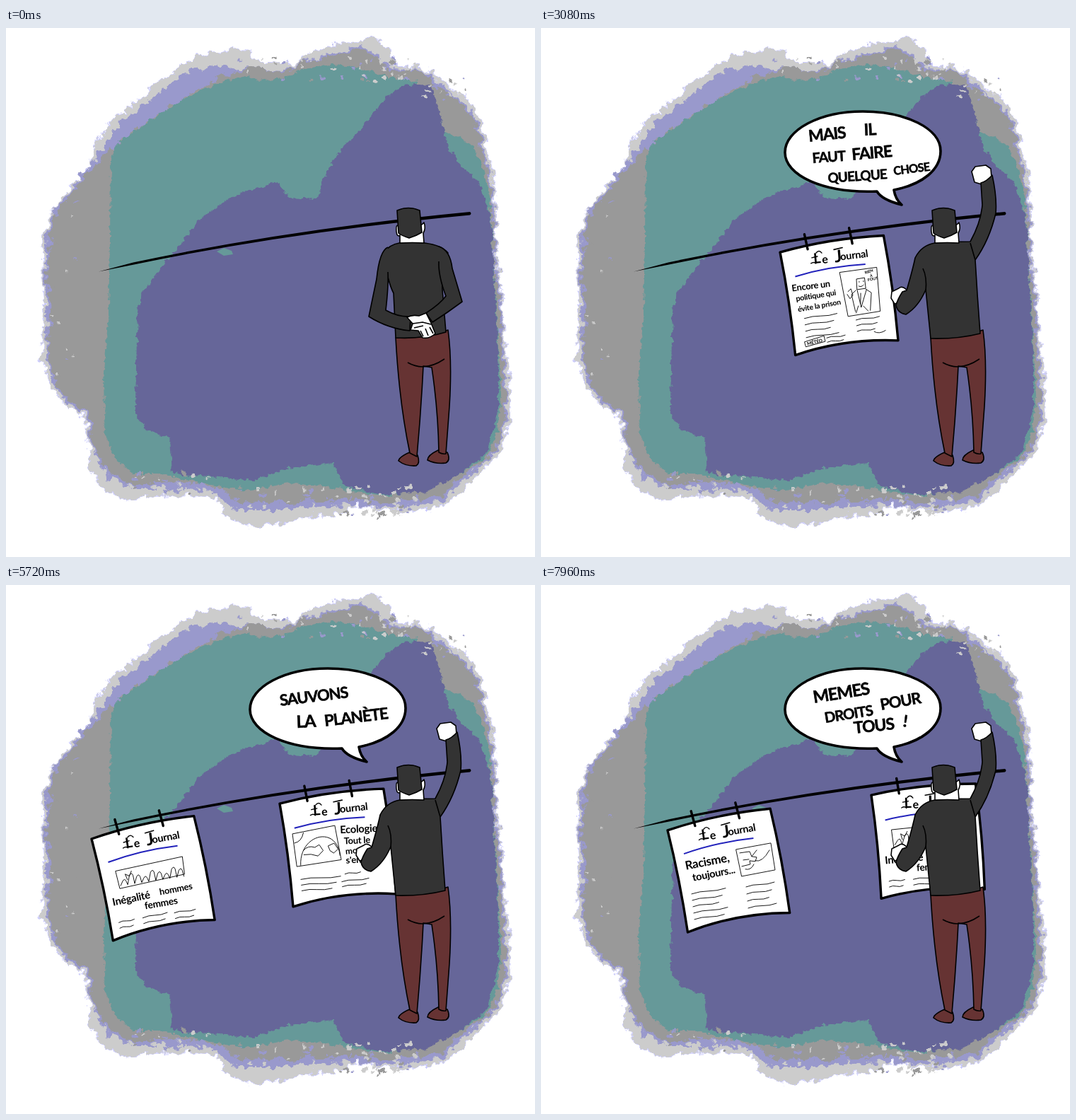
An HTML page for the animation above (8 s loop, 748 by 748 pixels).

```html
<!DOCTYPE html>
<html lang="fr">
<head>
<meta charset="utf-8">
<title>Le Journal</title>
<style>
html, body { margin: 0; width: 100%; height: 100%; overflow: hidden; background: #fff; }
svg { position: absolute; left: 0; top: 0; width: 100%; height: 100%; }
#wall { will-change: transform; }
text { font-family: Lato, "Open Sans", sans-serif; font-weight: 700; fill: #000; letter-spacing: -.02em; }
#speech text { stroke: #000; stroke-width: .5; letter-spacing: -.05em; }
.ink { fill: none; stroke: #000; stroke-linecap: round; stroke-linejoin: round; }
.body { stroke: #000; stroke-width: 1.6; stroke-linejoin: round; }
</style>
</head>
<body>
<svg id="wall" viewBox="0 0 748 748">
  <filter id="rough" filterUnits="userSpaceOnUse" x="0" y="0" width="748" height="748" color-interpolation-filters="sRGB">
    <feTurbulence type="fractalNoise" baseFrequency=".08" numOctaves="4" seed="8"/>
    <feDisplacementMap in="SourceGraphic" scale="19" xChannelSelector="R" yChannelSelector="G"/>
  </filter>
  <filter id="grain" filterUnits="userSpaceOnUse" x="0" y="0" width="748" height="748" color-interpolation-filters="sRGB">
    <feTurbulence type="fractalNoise" baseFrequency=".13" numOctaves="3" seed="3"/>
    <feDisplacementMap in="SourceGraphic" scale="9" xChannelSelector="R" yChannelSelector="G"/>
  </filter>
  <g filter="url(#rough)">
    <path fill="#ccc" stroke="#ccf" stroke-width="1" d="M120 190L125 165 150 130 185 103 215 78 250 52 275 38 330 28 360 48 410 50 435 32 480 20 520 13 545 35 550 52 590 55 612 72 640 92 662 108 675 145 688 200 692 250 695 320 703 400 708 460 714 510 712 560 700 600 670 628 640 660 600 682 560 685 500 675 470 688 430 690 390 700 345 705 310 690 300 665 260 662 215 662 170 668 140 655 118 620 112 550 85 535 62 505 50 470 55 400 52 350 53 300 62 265 85 230 110 205Z"/>
    <path fill="#99c" d="M59 290L70 255 103 214 142 165 160 135 200 105 255 62 290 52 330 58 395 60 430 44 500 25 527 38 548 57 592 60 625 88 657 112 671 150 683 200 689 240 693 320 701 400 705 460 709 520 705 570 688 606 648 638 617 669 550 678 480 674 400 682 330 682 292 655 230 652 180 652 142 633 119 590 114 547 87 533 66 500 57 465 59 400 55 350Z"/>
    <path fill="#999" d="M63 290L76 255 106 216 150 170 230 112 310 66 345 58 395 62 430 46 500 29 525 41 545 59 590 62 620 90 655 115 668 150 680 200 686 240 690 320 698 400 702 460 706 520 702 570 685 605 645 635 615 662 550 670 480 666 400 672 330 670 295 648 230 642 180 645 145 630 122 590 118 545 90 530 70 500 60 465 63 400 59 350Z"/>
  </g>
  <g filter="url(#grain)">
    <path fill="#699" d="M148 185L155 165 205 130 260 95 310 75 340 68 360 75 395 70 420 58 460 52 500 56 540 68 580 76 610 110 620 148 640 154 662 168 675 200 684 240 688 320 694 400 697 460 700 520 695 570 680 605 640 632 600 650 540 662 490 655 440 648 400 643 340 655 300 648 250 638 215 630 180 630 155 610 140 575 138 500 145 400 147 300Z"/>
    <path fill="#669" d="M186 400L190 378 215 345 240 315 270 275 310 245 340 230 385 218 400 240 440 242 448 215 470 175 500 145 535 100 560 82 600 78 612 115 625 170 645 195 668 218 684 260 688 320 693 400 696 460 696 540 680 600 640 632 595 655 540 660 480 650 462 615 400 622 350 640 300 635 235 630 232 580 200 570 183 545 184 480Z"/>
    <g id="specks"></g>
  </g>
  <path id="spot" fill="#699" d="M298 316l10-5 11 4 2 5-13 2z"/>
</svg>

<svg id="scene" viewBox="0 0 748 748">
  <path d="M131 344.500L180 331.500Q400 284.500 656 260q3 2 0 4.500Q400 289 181 334.500Z"/>
  <g id="papers"></g>

  <g class="body">
    <g fill="#633">
      <path d="M573 599Q556 606 555 612Q565 620 580 619Q586 616 582 604ZM611 597Q596 604 596 611Q608 617 622 615Q629 611 624 600Z"/>
      <path d="M551 438Q590 440 625 427Q631 470 627 535L622 602Q617 603 612 600Q611 540 602 480L590 478Q587 540 581 606L571 601Q556 530 551 438Z"/>
      <path fill="none" d="M568 473Q592 487 620 468"/>
    </g>
    <g id="calm" fill="#333">
      <path d="M556 304Q575 302 592 304Q616 307 625 318Q615 330 617 370L622 430Q590 440 551 438L548 375Q540 360 533 318Q543 306 556 304Z"/>
      <path d="M540 310Q528 315 524 355L513 408Q540 425 571 428L572 408Q555 409 537 399Q541 365 540 345"/>
      <path d="M612 309Q628 314 631 340L645 387Q625 402 603 416L594 403Q614 390 622 379Q611 350 612 330"/>
      <path fill="#fff" d="M567 409Q574 405 584 407L594 403 601 417 607 432Q599 440 589 438L583 428 572 427 575 418Z"/>
      <path fill="none" d="M575 418l14-2 12 3M577 424l13-3M586 428l4 8M593 425l4 10M599 423l5 9"/>
    </g>
    <g id="angry" fill="#333">
      <path fill="#fff" d="M517 370Q510 364 506 368L496 373 495 382 500 390 508 388Z"/>
      <path fill="#fff" d="M609 203L614 196 629 194 636 199 637 211 623 221 613 218Z"/>
      <path d="M557 304Q575 302 607 302Q622 275 624 250L622 219Q630 217 638 208Q645 240 643 262Q634 300 614 328Q617 380 621 432Q590 440 551 439L544 370Q534 394 516 405Q504 403 502 392Q504 384 511 373L517 371Q526 340 529 325Q538 307 557 304Z"/>
      <path fill="none" d="M540 340Q546 352 544 372M614 328l-7-24"/>
    </g>
    <path fill="#fff" d="M557 284Q551 273 552 288Q553 296 557 293L557 304Q575 303 591 304L590 290Q594 283 591 275L588 278Z"/>
    <path fill="#333" d="M553 258Q569 251 585 258L588 289Q580 294 570 297Q560 294 555 290Z"/>
  </g>

  <g id="bubble">
    <path fill="#fff" stroke="#000" stroke-width="3.600" stroke-linejoin="round" d="M475 231Q482 243 510 250Q501 242 499 229C540 221 565 200 565 174C565 142 516 118 455 118C394 118 345 144 345 176C345 208 398 234 475 231Z"/>
    <g id="speech"></g>
  </g>
</svg>

<script>
const $ = id => document.getElementById(id);
const LOOP = 8000, STEP = 40;

const word = (s, x, y, size, turn = -8) =>
  `<text x="${x}" y="${y}" font-size="${size}" transform="rotate(${turn} ${x} ${y})">${s}</text>`;
const ink = (d, width = .9) => `<path class="ink" stroke-width="${width}" d="${d}"/>`;

// Rows of wavy lines standing in for small print
const rows = (x, y, width, count, gap = 9, rise = .17) => {
  let d = '';
  for (let i = 0; i < count; i++) {
    const w = width * (1 - .12 * (i % 3)), h = -w * rise;
    d += `M${x + i} ${y + i * gap}q${w / 4} ${h / 4 - 2} ${w / 2} ${h / 2}t${w / 2} ${h / 2}`;
  }
  return ink(d);
};

const sheet = `
  <path d="M290 326Q360 305 436 300Q451 372 459 448Q383 446 314 471Q305 395 290 326Z" fill="#fff" stroke="#000" stroke-width="3.400" stroke-linejoin="round"/>
  ${ink('M324 300l5 21M387 290l5 22', 3.4)}
  ${word('L', 338, 341, 20, -6)}${word('e', 350, 341, 16, -6)}
  ${ink('M335 333l8-2M334 341q4-3 7 0M341 326q4-5 8 0', 1.4)}
  ${word('J', 368, 339, 24, -6)}${word('ournal', 376, 336, 14.5, -8)}
  ${ink('M366 321l12-3', 1.6)}
  <path d="M312 360Q358 345 411 341" fill="none" stroke="#22b" stroke-width="2"/>`;

const politics = `
  ${word('Encore un', 308, 381, 12.8)}${word('politique qui', 314, 395, 10.8, -10)}
  ${word('évite la prison', 317, 410, 10.4, -11)}
  ${ink('M375 353L427 345 433 407 388 415ZM399 362l11-2 2 15-12 2zM402 366h1M408 365h1M402 372q4 2 7-2M398 378l-6 6 6 24M412 376l8 5-1 25M400 378l6 24 7-25M387 380l4-4 3 9-4 5-4-6M405 382v15M402 400l-3 10M409 400l7 7')}
  ${word('RIEN', 411, 355, 5.5, -20)}${word('À', 418, 359, 5, -10)}${word('FOUT', 415, 365, 5.5, -12)}
  ${rows(326, 419, 46, 4)}${rows(358, 446, 26, 2, 6)}${rows(399, 420, 33, 3, 8)}
  ${ink('M327 452L354 443 356 451 329 459ZM425 436q7 4 16-2')}${word('MÉTÉO', 331, 457, 6.5, -14)}`;

const ecology = `
  ${word('Ecologie:', 367, 367, 14.8, -5)}${word('Tout le', 373, 382, 13, -5)}
  ${word('monde', 376, 396, 12, -7)}${word('s\'en fou', 377, 409, 13, -5)}
  ${ink('M300 370L359 356 370 404 308 416ZM303 383q10-2 12-15M313 414C309 370 362 355 368 398M316 393q6-8 16-5l6-4 6 8-7 8-10-2-10 1M351 385l8-4 6 8-6 6-5-3z')}
  ${rows(314, 434, 56, 3, 8, .12)}${rows(376, 424, 22, 1)}${rows(372, 435, 38, 2, 7)}`;

// A crowd of heads of uneven height
const crowd = Array.from({ length: 9 }, (_, i) => {
  const h = 6 + 3.5 * (i * 5 % 3);
  return `l3 ${-h}q3-5 5 0l2 ${h - 1}`;
}).join('');
const equality = `
  ${ink('M327 371L422 355 424 380 332 396ZM333 392' + crowd + 'M343 384l-3-8 6 3 3-7')}
  ${word('Inégalité', 321, 420, 14.8, -9)}${word('hommes', 388, 408, 12.8, -8)}${word('femmes', 366, 427, 13.8, -7)}
  ${rows(328, 444, 22, 2, 8)}${rows(362, 439, 35, 2, 8)}${rows(407, 434, 30, 2, 8, .12)}`;

const racism = `
  ${word('Racisme,', 205, 404, 16.8, -11)}${word('toujours...', 215, 420, 14.6, -11)}
  ${ink('M276 375L325 366 331 404 284 413ZM281 380l14-2 3 7 7 1-2 6-8-1 1 5-12 3M298 385l7-9M303 391q10 3 20-15M289 403q8 2 12-7M286 390l8-1')}
  ${rows(213, 438, 48, 5)}${rows(290, 428, 40, 4, 10)}`;

// base: position the content was laid out at; path: [ms, x] stops
const papers = [
  { body: politics, base: [290, 326, 0], path: [[500, 118], [640, 122], [1320, 225], [1900, 289], [2650, 291], [3080, 338], [3840, 475], [4080, 518]] },
  { body: ecology, base: [280, 328, .2], path: [[3130, 118], [3300, 122], [3840, 191], [4440, 280], [4720, 292], [5020, 294], [5450, 335], [5720, 387], [6340, 520]] },
  { body: equality, base: [295, 324, -.2], path: [[5620, 118], [5720, 121], [6360, 241], [6640, 295], [6840, 306], [6960, 308], [7400, 361], [7960, 467], [8040, 482]] },
  { body: racism, base: [179, 348, 1.8], path: [[7340, 118], [7520, 122], [7960, 179], [8040, 192]] }
];

const speeches = [
  [2400, word('MAIS', 379, 161, 23, -6) + word('IL', 457, 152, 23, -3) + word('FAUT', 384, 191, 20, -4) +
    word('FAIRE', 440, 187, 23, -5) + word('QUELQUE', 406, 219, 19, -4) + word('CHOSE', 499, 208, 16.5, -7)],
  [4880, word('SAUVONS', 388, 171, 22, -7) + word('LA', 411, 202, 24, -3) + word('PLANÈTE', 451, 200, 22.5, -7)],
  [6800, word('MEMES', 386, 167, 24, -9) + word('DROITS', 402, 195, 20.5, -9) + word('POUR', 481, 177, 22, -10) +
    word('TOUS', 443, 210, 23, -6) + word('!', 511, 200, 23, 8)]
];

// Smooth curve through the stops that never overshoots
function along(path, t) {
  const slope = i => (path[i + 1][1] - path[i][1]) / (path[i + 1][0] - path[i][0]);
  const last = path.length - 1;
  const tangent = i => {
    if (i === 0) return slope(0);
    if (i === last) return slope(last - 1);
    const a = slope(i - 1), b = slope(i);
    return 2 * a * b / (a + b);
  };
  let i = 0;
  while (i < last - 1 && t > path[i + 1][0]) i++;
  const [t0, x0] = path[i], [t1, x1] = path[i + 1];
  const h = t1 - t0, u = (t - t0) / h, v = 1 - u;
  return x0 * v * v * (1 + 2 * u) + x1 * u * u * (3 - 2 * u) + h * u * v * (v * tangent(i) - u * tangent(i + 1));
}

// Height and tilt of a sheet hanging at x on the sagging line
const hang = x => {
  const a = x - 121, b = x - 290;
  return { y: 359 - .198 * a + 1.07e-4 * a * b, tilt: 11.9 - .0148 * a - 2.08e-5 * a * b };
};

function addSpecks() {
  let seed = 7;
  const rnd = () => (seed = seed * 16807 % 2147483647) / 2147483647;
  const colors = ['#ccc', '#99c', '#999', '#ccc'];
  // count, x, width, y, height, size
  const areas = [[70, 310, 270, 648, 42, 2.5], [50, 330, 250, 42, 35, 1.8], [34, 170, 120, 628, 32, 2], [14, 590, 60, 70, 32, 2], [16, 62, 45, 240, 260, 1]];
  let out = '';
  for (const [count, x, w, y, h, size] of areas)
    for (let i = 0; i < count; i++)
      out += `<ellipse cx="${x + rnd() * w}" cy="${y + rnd() * h}" rx="${1 + rnd() * size * 1.5}" ry="${1 + rnd() * size}" fill="${colors[i % 4]}"/>`;
  $('specks').innerHTML = out;
}

addSpecks();
$('papers').innerHTML = papers.map(({ body, base: [x, y, turn] }) =>
  `<g>${sheet}<g transform="translate(${290 - x} ${326 - y}) rotate(${turn} ${x} ${y})">${body}</g></g>`).join('');
$('speech').innerHTML = speeches.map(([, s]) => `<g>${s}</g>`).join('');

const show = (el, on) => { el.style.display = on ? '' : 'none'; };

function draw(t) {
  papers.forEach(({ path }, i) => {
    const el = $('papers').children[i];
    const on = t >= path[0][0] && t < path[path.length - 1][0];
    show(el, on);
    if (!on) return;
    const x = along(path, t), { y, tilt } = hang(x);
    el.setAttribute('transform', `translate(${x - 290} ${y - 326}) rotate(${9.4 - tilt} 290 326)`);
  });
  speeches.forEach(([from], i) => {
    const until = i + 1 < speeches.length ? speeches[i + 1][0] : LOOP;
    show($('speech').children[i], t >= from && t < until);
  });
  const angry = t >= speeches[0][0];
  show($('angry'), angry);
  show($('bubble'), angry);
  show($('calm'), !angry);
  show($('spot'), t < 2200 || t >= 5520);
}

const start = performance.now();
function tick() {
  const t = (performance.now() - start) % LOOP;
  draw(Math.floor(t / STEP) * STEP);
  requestAnimationFrame(tick);
}
tick();
</script>
</body>
</html>
```
